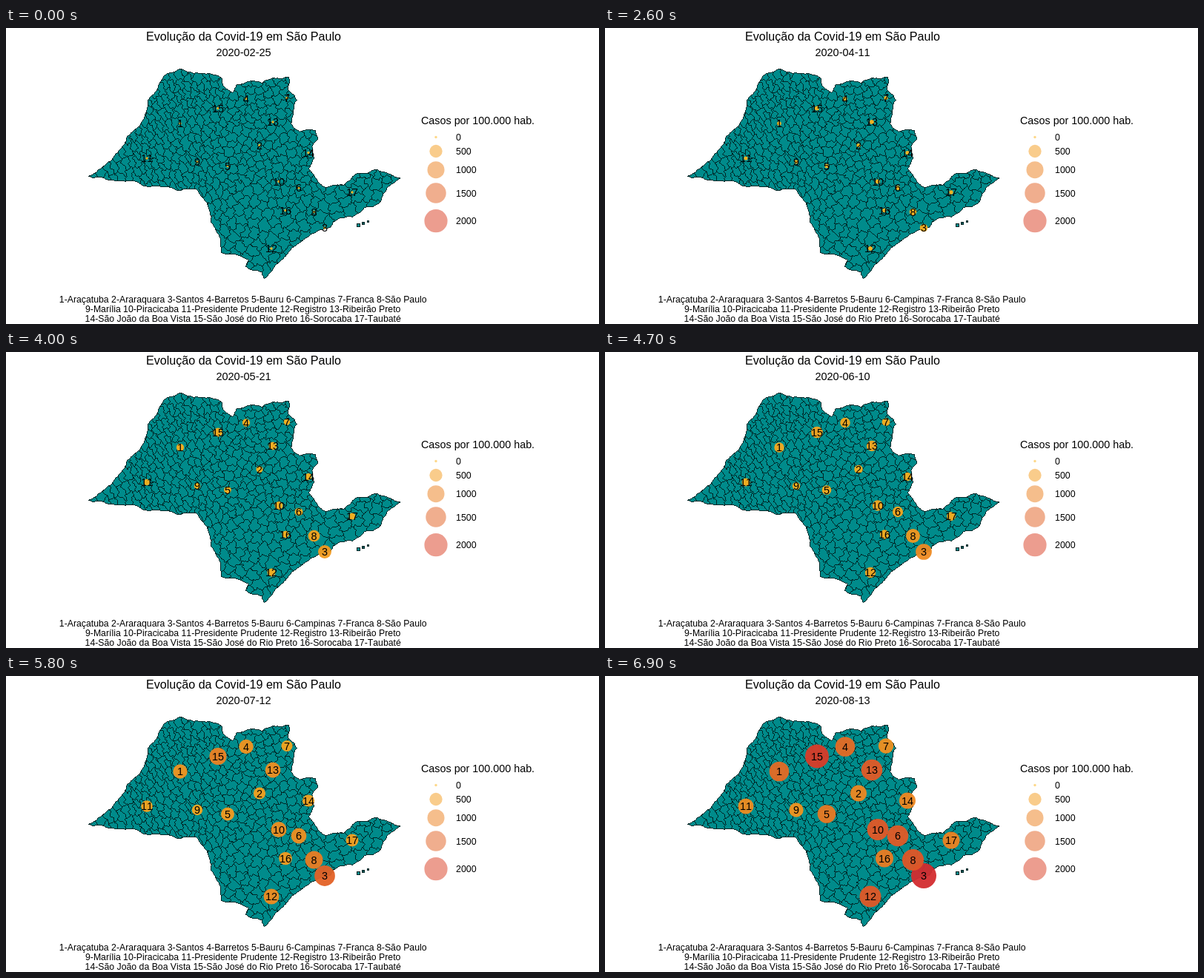
These frames come from a looping animation (800 by 400 pixels, 10000 ms). An HTML page with a canvas:

```html
<!DOCTYPE html>
<html lang="pt-BR">
<head>
<meta charset="utf-8">
<title>Evolução da Covid-19 em São Paulo</title>
<style>
  html, body { margin: 0; width: 100%; height: 100%; overflow: hidden; background: #fff; }
  canvas { display: block; }
</style>
</head>
<body>
<canvas id="stage" width="800" height="400"></canvas>
<script>
const W = 800, H = 400, LOOP = 10000, STEP_MS = 100, HOLD = 10, STEPS = 59, DAYS = 170;
const ctx = document.getElementById('stage').getContext('2d');

let seed = 20200225;
const random = () => (seed = (seed * 1664525 + 1013904223) % 4294967296) / 4294967296;
const clamp = (v, lo, hi) => Math.min(hi, Math.max(lo, v));

// Corners of the state border, clockwise from the western tip
const border = `108,200 134,185 151,167 163,147 184,126 191,100 204,82 213,64 234,55 253,61
  292,68 294,79 306,87 311,76 345,74 360,67 382,66 381,84 393,97 385,130 396,140 418,138
  421,150 413,160 416,176 409,190 430,215 455,212 472,197 500,191 533,203 514,217 503,238
  484,243 468,256 448,258 437,270 408,283 385,299 367,318 348,339 345,330 323,322 327,313
  290,304 289,285 276,262 271,237 257,218 212,215 176,208 117,203`
  .split(/\s+/).map(p => p.split(',').map(Number));

// x, y, final bubble radius, and how late the cases arrive
const cities = [
  [235, 129, 13.3], [342, 158.5, 11], [430, 270, 17, 1.1], [324, 95.5, 13.3], [299, 186.5, 12.3],
  [395, 216, 14.3], [379, 94.5, 10.2], [415.5, 248.5, 14.6, 1.1], [258, 181, 9.7],
  [368, 207.5, 14.4], [190, 176, 10.5], [358, 298, 14.5], [360, 127, 14.3], [408, 168.5, 11],
  [286, 108.5, 16], [377, 246.5, 12], [467, 222, 11.5]
];

const DOT = 1.7, SCALE = .311;
const toRadius = cases => DOT + SCALE * Math.sqrt(cases);
const toCases = radius => ((radius - DOT) / SCALE) ** 2;

function heatColor(cases) {
  const k = cases / 1000;
  return `hsl(${41 - 9 * k - 3.5 * k * k}, ${97 - 13 * k}%, ${55 - 2 * k}%)`;
}

function roughen(points) {
  return points.flatMap((p, i) => {
    const q = points[(i + 1) % points.length];
    const k = (random() - .5) * .2, dx = q[0] - p[0], dy = q[1] - p[1];
    return [p, [p[0] + dx / 2 - dy * k, p[1] + dy / 2 + dx * k]];
  });
}

// Municipalities: wavy nearest-site cells, narrow strips towards the west
function buildMap() {
  const map = document.createElement('canvas');
  map.width = W;
  map.height = H;
  const g = map.getContext('2d');
  g.fillStyle = '#008b8b';
  g.beginPath();
  [1, 2, 3, 4].reduce(roughen, border).forEach(p => g.lineTo(...p));
  g.closePath();
  for (let i = 0; i < 3; i++) g.rect(473 + 7 * i, 264 - 2 * i, 5 - i, 5 - i);
  g.fill();

  const image = g.getImageData(0, 0, W, H), px = image.data;
  const inside = (x, y) => px[(y * W + x) * 4 + 3] > 110;
  const stretchAt = x => 2.2 * clamp((310 - x) / 70, 0, 1);
  const distance = (x, y, s, stretch) => {
    const dx = x - s[0], dy = y - s[1], across = .93 * dx - .37 * dy;
    return dx * dx + dy * dy + stretch * across * across;
  };
  const sites = [];
  for (let i = 0; i < 12000; i++) {
    const x = 105 + random() * 430, y = 52 + random() * 290;
    if (!inside(x | 0, y | 0)) continue;
    const stretch = stretchAt(x), gap = (y > 225 ? 9 : 7 + stretch) + 5 * random();
    if (sites.every(s => distance(x, y, s, stretch) > gap * gap)) sites.push([x, y]);
  }

  const owner = new Int16Array(W * H).fill(-1);
  for (let y = 0; y < H; y++) for (let x = 0; x < W; x++) {
    if (!inside(x, y)) continue;
    const u = x + 1.3 * Math.sin(y * .55 + 2 * Math.sin(x * .13)) + .6 * Math.sin(y * 1.3 + x * .4);
    const v = y + 1.3 * Math.sin(x * .6 + 2 * Math.sin(y * .17)) + .6 * Math.sin(x * 1.2 - y * .5);
    const stretch = stretchAt(x);
    let best = Infinity;
    sites.forEach((s, i) => {
      const d = distance(u, v, s, stretch);
      if (d < best) { best = d; owner[y * W + x] = i; }
    });
  }
  owner.forEach((o, i) => {
    px[i * 4 + 3] = o < 0 ? 0 : 255;
    if (o < 0) return;
    const near = [owner[i - 1], owner[i + 1], owner[i - W], owner[i + W]];
    const edge = near.some(n => n < 0 || n > o);
    px.set(edge ? [0, 38, 38] : [0, 139, 139], i * 4);
  });
  g.putImageData(image, 0, 0);
  return map;
}

function text(str, x, y, size, align = 'center') {
  ctx.font = `${size}px "Liberation Sans", Arial, sans-serif`;
  ctx.fontKerning = 'none';
  ctx.textAlign = align;
  ctx.fillStyle = '#000';
  ctx.fillText(str, x, y);
}

function bubble(x, y, cases, alpha) {
  ctx.globalAlpha = alpha;
  ctx.fillStyle = heatColor(cases);
  ctx.beginPath();
  ctx.arc(x, y, toRadius(cases), 0, 7);
  ctx.fill();
  ctx.globalAlpha = 1;
}

const map = buildMap();
const caption = [
  '1-Araçatuba 2-Araraquara 3-Santos 4-Barretos 5-Bauru 6-Campinas 7-Franca 8-São Paulo',
  '9-Marília 10-Piracicaba 11-Presidente Prudente 12-Registro 13-Ribeirão Preto',
  '14-São João da Boa Vista 15-São José do Rio Preto 16-Sorocaba 17-Taubaté'
];

function draw() {
  const step = clamp(Math.floor(performance.now() % LOOP / STEP_MS) - HOLD, 0, STEPS);
  const day = Math.floor(step * DAYS / STEPS);
  ctx.fillStyle = '#fff';
  ctx.fillRect(0, 0, W, H);
  ctx.drawImage(map, 0, 0);

  text('Evolução da Covid-19 em São Paulo', 320.5, 17, 16.1);
  text(new Date(Date.UTC(2020, 1, 25 + day)).toISOString().slice(0, 10), 320.5, 38, 14.5);
  caption.forEach((line, i) => text(line, 319.7, 371 + 13 * i, 12.27));

  text('Casos por 100.000 hab.', 560, 130, 14.35, 'left');
  for (let i = 0; i < 5; i++) {
    const y = 147.5 + 19 * i + 3.1 * i * (i - 1);
    bubble(580, y, i * 500, .52);
    text(i * 500, 607, y + 4.5, 12.4, 'left');
  }

  for (const [x, y, radius, delay = 1.8] of cities) {
    bubble(x, y, toCases(radius) * (step / STEPS) ** (2 * delay), .95);
  }
  cities.forEach(([x, y], i) => text(i + 1, x, y + 5, 14.4));
  requestAnimationFrame(draw);
}
draw();
</script>
</body>
</html>
```
